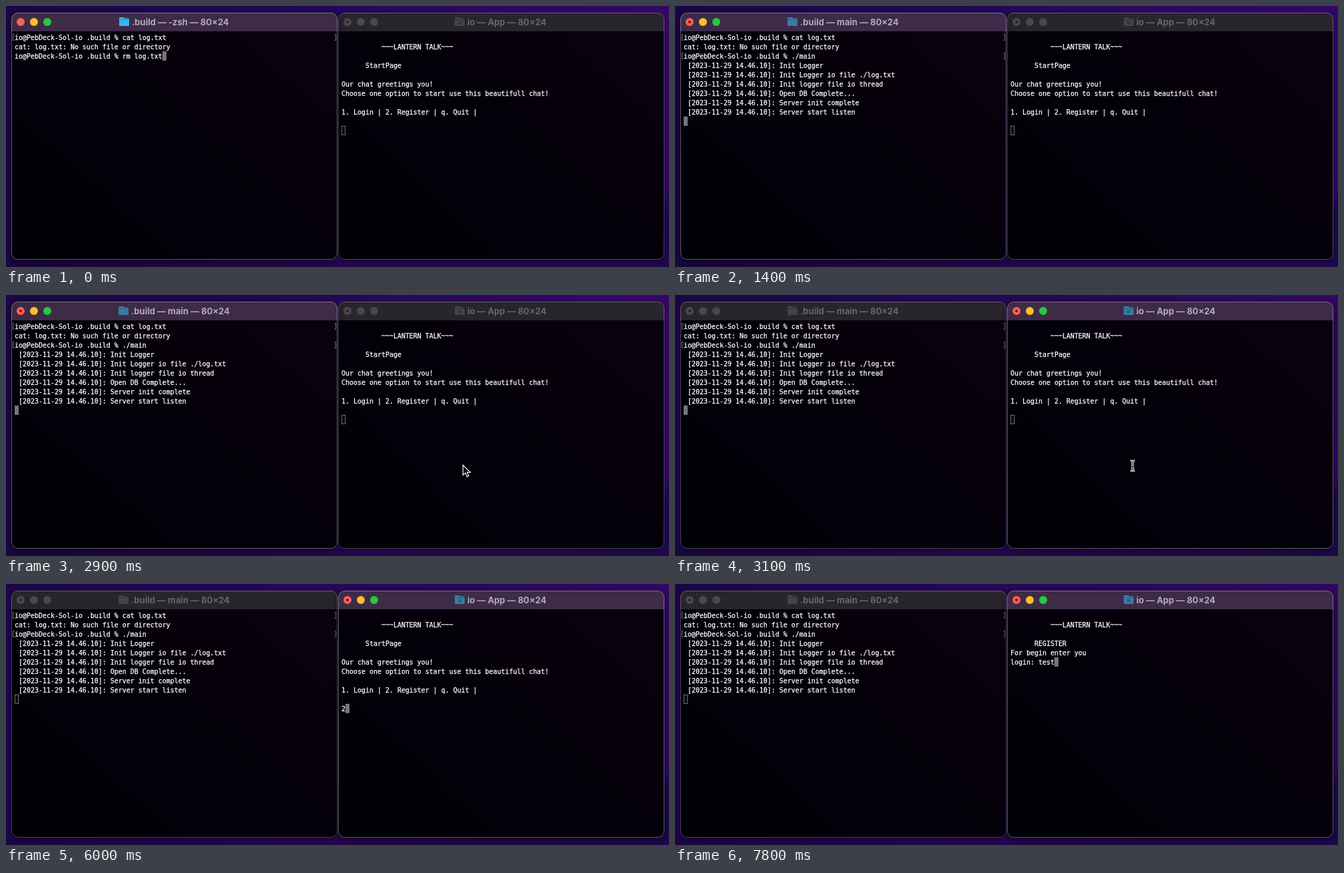
An HTML page with a canvas for the animation above (8 s loop, 996 by 392 pixels).

```html
<!DOCTYPE html>
<html lang="en">
<head>
<meta charset="utf-8">
<title>Two terminals</title>
<style>
html, body { margin: 0; width: 100%; height: 100%; overflow: hidden; background: #1d0648; }
canvas { display: block; }
</style>
</head>
<body>
<canvas id="stage" width="996" height="392"></canvas>
<script>
const ctx = document.getElementById('stage').getContext('2d');
const LOOP = 8000, STEP = 100;
const CELL = 6, ROW = 14, TOP = 40;
const MONO = '9.967px "DejaVu Sans Mono", monospace';
const TITLE = '700 13px Inter, sans-serif';

const prompt = 'io@PebDeck-Sol-io .build % ';
const stamp = ' [2023-11-29 14.46.10]: ';
const log = ['Init Logger', 'Init Logger io file ./log.txt', 'Init logger file io thread',
  'Open DB Complete...', 'Server init complete', 'Server start listen'].map(s => stamp + s);
const banner = ['', ' '.repeat(10) + '~~~LANTERN TALK~~~', ''];
const startPage = [...banner, '      StartPage', '', 'Our chat greetings you!',
  'Choose one option to start use this beautifull chat!', '',
  '1. Login | 2. Register | q. Quit |', ''];

// Last value whose start time has passed.
const at = (t, keys) => keys.reduce((v, [start, value]) => t >= start ? value : v, null);

const typed = t => at(t, [[0, 'rm log.txt'], [100, 'rm log.tx'], [200, 'rm log.'], [300, 'rm lo'],
  [400, 'rm '], [500, 'r'], [600, ''], [900, '.'], [1000, './'], [1100, './m'],
  [1200, './ma'], [1300, './main']]);
const login = t => at(t, [[0, ''], [7100, 't'], [7500, 'te'], [7700, 'tes'], [7800, 'test']]);

function leftLines(t) {
  const lines = [prompt + 'cat log.txt', 'cat: log.txt: No such file or directory', prompt + typed(t)];
  return t < 1400 ? lines : [...lines, ...log, ''];
}

function rightLines(t) {
  if (t < 6400) return [...startPage, t < 6000 ? '' : '2'];
  if (t < 6500) return [...banner, ''];
  return [...banner, '      REGISTER', 'For begin enter you', 'login: ' + login(t)];
}

function box(x, y, w, h, r, fill) {
  ctx.beginPath();
  ctx.roundRect(x, y, w, h, r);
  ctx.fillStyle = fill;
  ctx.fill();
}

function disc(x, y, r, fill) {
  ctx.beginPath();
  ctx.arc(x, y, r, 0, 7);
  ctx.fillStyle = fill;
  ctx.fill();
}

function gradient(x0, y0, x1, y1, ...colors) {
  const g = ctx.createLinearGradient(x0, y0, x1, y1);
  colors.forEach((c, i) => g.addColorStop(i / (colors.length - 1), c));
  return g;
}

function desktop() {
  ctx.fillStyle = gradient(0, 120, 996, 0, '#1c0548', '#25075a', '#350668');
  ctx.fillRect(0, 0, 996, 392);
  ctx.fillStyle = gradient(0, 381, 996, 381, '#19063f', '#260650', '#1d0a48');
  ctx.fillRect(0, 381, 996, 11);
  ctx.fillStyle = '#1d0850';
  ctx.beginPath();
  ctx.moveTo(960, 392);
  ctx.lineTo(996, 280);
  ctx.lineTo(996, 392);
  ctx.fill();
}

function folder(x, color, home) {
  box(x, 17, 8, 5, 1, color);
  box(x, 18.5, 15, 11.5, 1.5, color);
  ctx.fillStyle = 'rgba(0,0,0,.22)';
  ctx.fillRect(x, 20, 15, 1);
  if (home) ctx.fillRect(x + 5, 23, 5, 4);
}

function frame(w) {
  const { x, active } = w;
  ctx.save();
  ctx.shadowColor = active ? 'rgba(0,0,0,.55)' : 'rgba(0,0,0,.35)';
  ctx.shadowBlur = active ? 14 : 8;
  ctx.shadowOffsetY = 3;
  box(x, 10, 490, 371, 10, '#030008');
  ctx.restore();
  box(x, 10, 490, 371, 10, gradient(x + 90, 381, x + 400, 30, '#010007', '#030009', '#0a010e'));
  box(x, 10, 490, 28, [10, 10, 0, 0], active ? '#3d2b47' : '#29252c');
  ctx.beginPath();
  ctx.roundRect(x + .5, 10.5, 489, 370, 9.5);
  ctx.strokeStyle = active ? 'rgba(255,255,255,.34)' : 'rgba(255,255,255,.27)';
  ctx.lineWidth = 1;
  ctx.stroke();

  ['#ff5f57', '#febc2e', '#28c840'].forEach((c, i) =>
    disc(x + 14 + 20 * i, 24, 6, active ? c : '#4a474d'));
  if (w.busy) disc(x + 14, 24, 2, active ? '#7b0d0b' : '#252228');

  folder(w.titleX - 19, active ? w.icon : '#454248', w.home);
  ctx.font = TITLE;
  ctx.fillStyle = active ? '#b4aab8' : '#68656b';
  ctx.fillText(w.title, w.titleX, 28.5);
}

function bracket(x, dir, row) {
  const y = TOP + row * ROW;
  ctx.beginPath();
  ctx.moveTo(x + 2 * dir, y + 2.5);
  ctx.lineTo(x, y + 2.5);
  ctx.lineTo(x, y + 11.5);
  ctx.lineTo(x + 2 * dir, y + 11.5);
  ctx.strokeStyle = '#77747b';
  ctx.lineWidth = 1;
  ctx.stroke();
}

function content(w) {
  const x = w.x + 5, last = w.lines.length - 1;
  const cx = x + w.lines[last].length * CELL, cy = TOP + last * ROW;
  if (w.solid) {
    ctx.fillStyle = '#77747a';
    ctx.fillRect(cx, cy, CELL, ROW);
  } else {
    ctx.strokeStyle = '#77747a';
    ctx.lineWidth = 1;
    ctx.strokeRect(cx + .5, cy + .5, CELL - 1, ROW - 1);
  }
  ctx.font = MONO;
  ctx.fillStyle = ctx.strokeStyle = '#fff';
  ctx.lineWidth = .25;
  w.lines.forEach((s, i) => {
    ctx.fillText(s, x, TOP + 11 + i * ROW);
    ctx.strokeText(s, x, TOP + 11 + i * ROW);
  });
  for (const row of w.marks) {
    bracket(10.5, 1, row);
    bracket(495.5, -1, row);
  }
}

function arrow(x, y) {
  const p = new Path2D('M0 0V15L3.6 11.8 6 17.4 8.6 16.2 6.2 10.8H11Z');
  ctx.save();
  ctx.translate(x + .5, y + .5);
  ctx.fillStyle = '#000';
  ctx.fill(p);
  ctx.strokeStyle = '#fff';
  ctx.lineWidth = 1.2;
  ctx.stroke(p);
  ctx.restore();
}

function beam(x, y) {
  const p = new Path2D('M-3.5-7.5Q0-7.5 0-5 0-7.5 3.5-7.5M0-5V5M-3.5 7.5Q0 7.5 0 5 0 7.5 3.5 7.5M-2 1H2');
  ctx.save();
  ctx.translate(x, y);
  for (const [color, width] of [['#fff', 3], ['#000', 1]]) {
    ctx.strokeStyle = color;
    ctx.lineWidth = width;
    ctx.stroke(p);
  }
  ctx.restore();
}

const clamp = v => Math.max(0, Math.min(1, v));
const ease = v => 1 - (1 - v) ** 2;

function pointer(t) {
  if (t < 1900 || t >= 6000) return;
  if (t >= 3100) return beam(687.5, 256.5);
  const a = ease(clamp((t - 1800) / 500)), b = ease(clamp((t - 2500) / 400));
  arrow(585 + 40 * a + 61 * b, 392 - 84 * a - 53 * b);
}

function draw(t) {
  const running = t >= 1400, swapped = t >= 3100, keys = t >= 3200;
  const left = {
    x: 8, active: !swapped, solid: !keys, busy: running, lines: leftLines(t),
    title: `.build — ${running ? 'main' : '-zsh'} — 80×24`, titleX: running ? 188 : 189,
    icon: running ? '#397ba5' : '#35b5f3', marks: running ? [0, 2] : [0]
  };
  const right = {
    x: 499, active: swapped, solid: keys, busy: true, lines: rightLines(t),
    title: 'io — App — 80×24', titleX: 693, icon: '#397ba5', home: true, marks: []
  };
  desktop();
  for (const w of swapped ? [left, right] : [right, left]) {
    frame(w);
    content(w);
  }
  pointer(t);
}

function tick() {
  const t = performance.now() % LOOP;
  draw(Math.floor(t / STEP) * STEP);
  requestAnimationFrame(tick);
}
tick();
</script>
</body>
</html>
```
